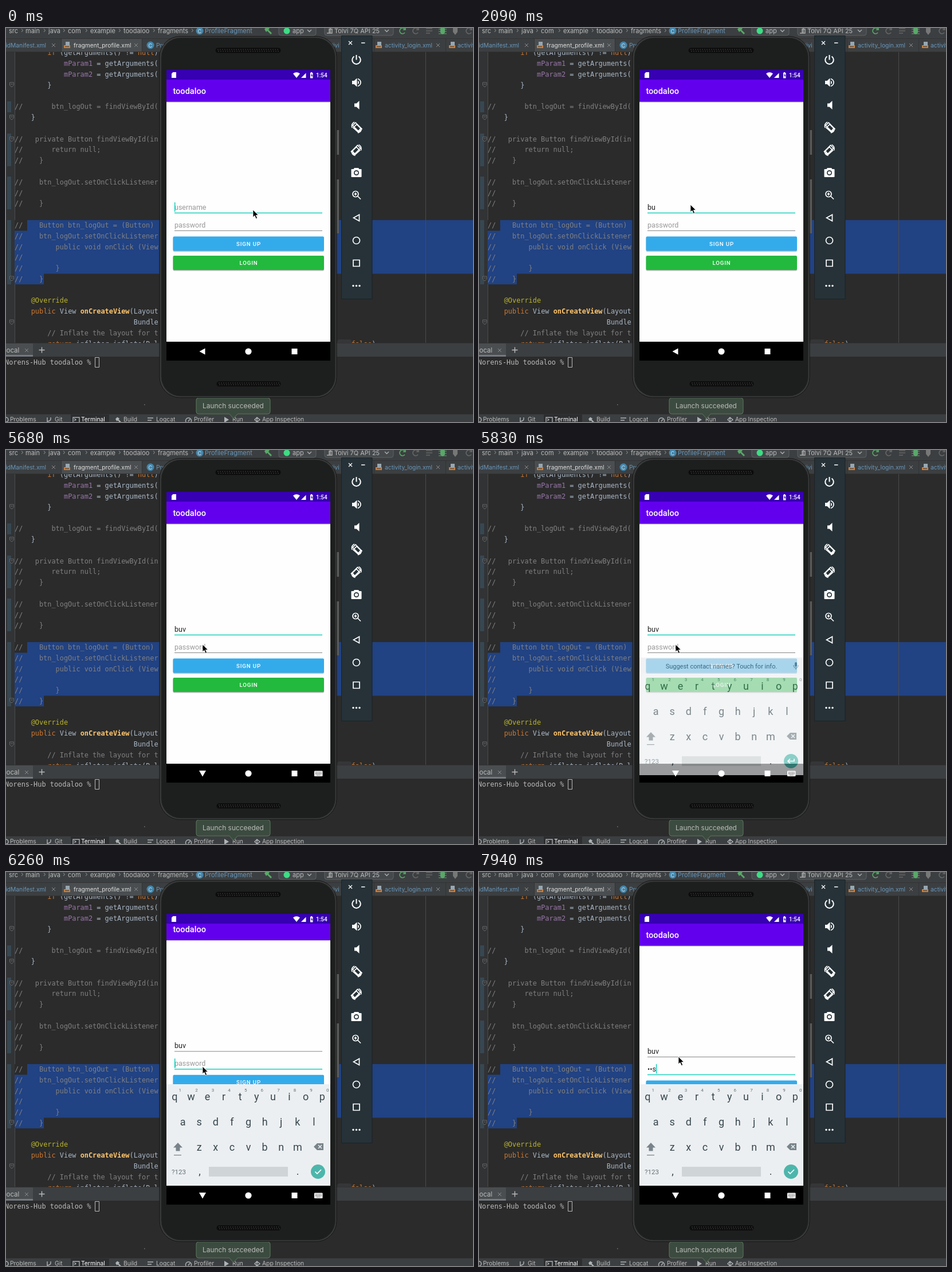
Recreate the animation shown at these times as an HTML page. Size 815 px wide and 687 px high, loop 8 s.

```html
<!DOCTYPE html>
<html lang="en">
<head>
<meta charset="utf-8">
<title>Login form in an emulator</title>
<style>
html, body { margin: 0; width: 100%; height: 100%; overflow: hidden; background: #2b2b2b; }
svg { display: block; }
text { white-space: pre; }
.mono { font: 11.9px "DejaVu Sans Mono", monospace; fill: #a9b7c6; }
.ui { font: 10.3px Inter, sans-serif; fill: #bbb; }
.app { font: 12.5px Roboto, sans-serif; fill: #222; }
.hint { fill: #999; }
.btn { font: 500 9.7px Roboto, sans-serif; letter-spacing: .85px; fill: #fff; text-anchor: middle; }
.line { fill: none; stroke: #fff; stroke-width: 1.7; }
#keys { font: 18px Roboto, sans-serif; fill: #37474f; text-anchor: middle; }
</style>
</head>
<body>
<svg width="815" height="687" viewBox="0 0 815 687">
  <defs>
    <clipPath id="screen"><path d="M280 73h286v507H280z"/></clipPath>
    <g id="rerun" fill="none" stroke-width="1.6"><path d="M4 3a5 5 0 1 1 0-6M5-6v4H1"/></g>
    <g id="file"><path fill="#9aa7b0" d="M-3-6h7v6h-7z"/><path fill="#d0803a" d="M-6 0H5v5H-6z"/><path stroke="#3c3f41" d="M-4 2.5h7"/></g>
    <path id="close" stroke="#888" d="M-3-3l6 6m0-6l-6 6"/>
    <path id="hammer" d="M-6-3l4-4 5 3-2 2 6 6-2 2-6-6-2 2z"/>
    <g id="fold" fill="#313335" stroke="#666"><path d="M-3.5-4h7v5l-3.5 3-3.5-3z"/><path d="M-2-1h4"/></g>
  </defs>

  <!-- editor -->
  <path fill="#2b2b2b" d="M0 0h815v687H0z"/>
  <path fill="#313335" d="M0 42h15v507H0z"/>
  <path fill="#374752" d="M2 128h7v19H2zM2 184h7v57H2zM2 259h7v57H2zM2 335h7v112H2z"/>
  <path fill="#214283" d="M37 335h778v93.5H66V447H15v-93.5h22z"/>
  <path stroke="#4b4b4b" d="M15.5 42v293M15.5 447v102M732.5 42v507"/>
  <g id="folds"></g>
  <g id="code" class="mono"></g>
  <rect x="578" y="543" width="25" height="14" rx="4" fill="#353638"/>

  <!-- toolbar and tabs -->
  <path fill="#3c3f41" d="M0 0h815v42H0z"/>
  <path fill="#4a4e50" d="M97 19h140v23H97z"/>
  <path stroke="#323232" d="M0 18.5h815M0 41.5h815M96.5 19v22M237.5 19v22M642.5 19v22M767.5 19v22"/>
  <g fill="#45494b" stroke="#5e6264"><rect x="476" y="-9" width="65" height="22" rx="4"/><rect x="556" y="-9" width="120" height="22" rx="4"/></g>
  <circle cx="490" cy="5" r="5.5" fill="#3ddc84"/>
  <path fill="none" stroke="#aaa" stroke-width="1.4" d="M526 3l3.5 3.5L533 3M661 3l3.5 3.5L668 3M560-2h6v11h-6M569 9h-5V2h5z"/>
  <use href="#hammer" x="457" y="5" fill="#59a869"/>
  <g stroke="#59a869"><use href="#rerun" x="692" y="5"/></g>
  <g stroke="#666"><use href="#rerun" x="715" y="5"/><use href="#rerun" x="808" y="5"/></g>
  <path stroke="#666" stroke-width="1.5" d="M733 1h11M733 5h11M733 9h7"/>
  <path fill="#59a869" d="M758 1q4-6 8 0v7q-4 6-8 0z"/>
  <path stroke="#59a869" d="M755 2h14M755 6h14M755 10h14"/>
  <path fill="#777" d="M780 0h8v7l-4 5-4-5z"/>
  <g fill="#4387ad"><circle cx="338" cy="5" r="6.5"/><circle cx="252" cy="30" r="6.5"/></g>
  <g id="tops" class="ui"></g>
  <use href="#file" x="107" y="30"/><use href="#file" x="651" y="30"/><use href="#file" x="779" y="30"/>
  <use href="#close" x="83" y="30"/><use href="#close" x="227" y="30"/><use href="#close" x="754" y="30"/>

  <!-- terminal and status strip -->
  <path fill="#3c3f41" d="M0 549h815v24H0zM0 674h815v13H0z"/>
  <path stroke="#323232" d="M0 549.5h815M0 673.5h815"/>
  <path fill="#4a4e50" d="M0 550h47v23H0z"/><path fill="#747a80" d="M0 570h47v3H0z"/>
  <use href="#close" x="36" y="562"/>
  <path stroke="#bbb" stroke-width="1.4" d="M57.500 561.500h10m-5-5v10"/>
  <text class="mono" x="-2" y="587" style="fill:#bbb">Norens-Hub toodaloo %</text>
  <path fill="none" stroke="#bbb" d="M155.500 574.500h7v17h-7z"/>
  <path fill="#777" d="M241 656h1.500v1.500H241z"/>
  <path fill="#2c2e30" d="M113 674h67v13h-67z"/>
  <g id="tools" class="ui"></g>
  <g fill="none" stroke="#aeb3b6" stroke-width="1.4">
    <circle cx="0" cy="683" r="4"/><path d="M72 679v9M78 679v3q0 3-6 4M117 679h11v9h-11zM119 681l3 2-3 2M247 680h10M247 684h7M314 687a5 5 0 1 1 9 0M318 686l3-4"/>
    <path fill="#aeb3b6" stroke="none" d="M381 678l8 5-8 5z"/><path d="M434 683l4-4 5 4-5 4zM438 679v8"/>
  </g>
  <use href="#hammer" x="196" y="684" fill="#aeb3b6" transform="translate(39 137) scale(.8)"/>
  <path fill="#3c4b3f" stroke="#5c7a5f" d="M336 645h121q4 0 4 4v20q0 4-4 4h-53l-7 8-7-8h-54q-4 0-4-4v-20q0-4 4-4z"/>
  <text class="ui" x="343" y="663" style="font-size:11.900px">Launch succeeded</text>

  <!-- phone -->
  <path fill="#5a5a5a" d="M577 178h4v43h-4zM577 264h4v94h-4z"/>
  <rect x="268" y="14.500" width="309" height="630" rx="36" fill="#3b3c3c" stroke="#151515"/>
  <rect x="271" y="17" width="303.500" height="625" rx="34" fill="#1d1e1e" stroke="#292a2a"/>
  <g stroke="#0c0c0c" stroke-width="9" stroke-linecap="round"><path d="M370 39h105M372 620.500h103"/></g>
  <path stroke="#333" stroke-width="1.500" stroke-dasharray="2 2" d="M369 37.500h108M370 40.500h108M371 619h106M372 622h106"/>

  <g clip-path="url(#screen)">
    <path fill="#fefefe" d="M280 73h286v507H280z"/>
    <g id="page" class="app">
      <path fill="#6200ee" d="M280 80h286v48.800H280z"/>
      <path opacity=".15" d="M280 128.800h286v1.400H280z"/>
      <text x="291.500" y="115" style="font:500 14.500px Roboto,sans-serif;fill:#fff">toodaloo</text>
      <text id="user" x="294" y="317"></text>
      <text id="pass" x="294" y="348"></text>
      <path id="line0" d="M294 322.500h258"/>
      <path id="line1" d="M294 353.500h258"/>
      <path id="caret" fill="#03cdb9" d="M0 0h1.400v16.500H0z"/>
      <path id="handle" fill="#2bd1c2" d="M308.300 322l5 3.300a7 7 0 1 1-10 0z"/>
      <g opacity=".3"><rect x="291.500" y="365" width="263.500" height="25" rx="2"/><rect x="291.500" y="398.500" width="263.500" height="25" rx="2"/></g>
      <rect x="291.500" y="363.500" width="263.500" height="25" rx="2" fill="#33abeb"/>
      <rect x="291.500" y="397" width="263.500" height="25" rx="2" fill="#23b93e"/>
      <text class="btn" x="423.500" y="380">SIGN UP</text>
      <text class="btn" x="423.500" y="413">LOGIN</text>
    </g>
    <path fill="#3700b3" d="M280 73h286v17H280z"/>
    <g fill="#fff">
      <path d="M291.500 77h5.500v10h-8v-7.500zM501 79.500q6-4.500 12 0l-6 7.500zM515 87l8.500-8.500V87zM531 78h1v-1h2v1h1.500v9.500H531z"/>
      <path fill="#3700b3" d="M534 79.500l-2 3.500h1.300v3l2-3.700H534z"/>
      <text x="541" y="86" style="font:500 10px Roboto,sans-serif">1:54</text>
    </g>
    <path d="M280 547h286v33H280z"/>
    <g id="keyboard">
      <path fill="#eceff1" d="M280 370h286v177H280z"/>
      <g id="strip">
        <path fill="#e9ecee" d="M280 342h286v28H280z"/>
        <text x="423" y="361" style="font:11px Roboto,sans-serif;fill:#37474f;text-anchor:middle">Suggest contact names? Touch for info.</text>
        <rect x="551" y="350" width="4" height="8" rx="2" fill="#607078"/>
        <path fill="none" stroke="#607078" d="M549 355q0 5 4 5t4-5M553 360v3"/>
      </g>
      <path fill="#cfd4d6" d="M354 514h138v17H354z"/>
      <g id="keys"></g>
      <path fill="#78848a" d="M300 472l8 8.500h-4.500v6h-7v-6H292zM293 493h13v1.200h-13zM543 473h11v12h-11l-6-6z"/>
      <path stroke="#eceff1" stroke-width="1.500" d="M545 476l6 6m0-6l-6 6"/>
      <circle cx="544.500" cy="522.500" r="12.500" fill="#4db6ac"/>
      <path id="enter" class="line"/>
    </g>
    <g fill="#fff">
      <path id="back"/>
      <circle cx="423" cy="564" r="5.600"/><path d="M498.500 559h10v10h-10z"/>
      <g id="switcher"><rect x="538" y="559.500" width="14.500" height="9.500" rx="1"/><path stroke="#111" stroke-dasharray="1.500 1" d="M540 562h11M540 564.500h11M542 567h7"/></g>
    </g>
  </g>

  <!-- emulator controls -->
  <path fill="#263238" stroke="#1b2226" d="M585.500 13.500h53.500v459h-53.500z"/>
  <path class="line" style="stroke-width:1.300" d="M598 23l6 6m0-6l-6 6M620 26h6.500"/>
  <g class="line">
    <path stroke-width="2" d="M607.500 49.500a7.300 7.300 0 1 0 8 0M611.500 47v8.500"/>
    <path id="turn" d="M606 174l6-6 7 7-5 6zM604 174q-2-7 4-10M620 174q1 7-6 9M605 170l5-5 11 11-5 5z"/>
    <use href="#turn" transform="matrix(-1 0 0 1 1223.500 39.500)"/>
    <circle cx="610" cy="289.500" r="5"/><path d="M613.500 293l5.500 5.500M607.500 289.500h5M610 287v5"/>
    <path d="M616.500 325.500v11l-10-5.500z"/><circle cx="611.500" cy="370.500" r="6"/><path d="M606 404.500h11v11h-11z"/>
  </g>
  <g fill="#fff">
    <path d="M604 92h3.500l5-4.500v15l-5-4.500H604zM608 131.500h3.500l5-4.500v15l-5-4.500H608zM614 91.500q4 3.500 0 7z"/>
    <path class="line" d="M614 88.500q5 2 5 6.500t-5 6.500" style="fill:none"/>
    <path d="M608 244h7l1.500 2h3q1 0 1 1v12q0 1-1 1h-16q-1 0-1-1v-12q0-1 1-1h3z"/>
    <circle cx="611.500" cy="252.500" r="4.500" fill="#263238"/><circle cx="611.500" cy="252.500" r="2.800"/>
    <circle cx="606" cy="449.500" r="1.700"/><circle cx="611.500" cy="449.500" r="1.700"/><circle cx="617" cy="449.500" r="1.700"/>
  </g>
  <path id="pointer" stroke="#fff" stroke-width=".8" d="M0 0v13l3-2.700 2.300 5.200 2.300-1-2.300-5h4.200z"/>
</svg>

<script>
const $ = id => document.getElementById(id);
const text = (x, y, s, style = '') => `<text x="${x}" y="${y}" style="${style}">${s}</text>`;

// editor lines: row, column, text, colour
const grey = '#808080', orange = '#cc7832', violet = '#9876aa';
const code = [
  [0, 8, 'if', orange], [0, 11, '(getArguments() !='], [0, 30, 'null', orange], [0, 34, ')'],
  [1, 12, 'mParam1', violet], [1, 20, '= getArguments('],
  [2, 12, 'mParam2', violet], [2, 20, '= getArguments('],
  [3, 8, '}'], [6, 4, '}'],
  [23, 4, '@Override', '#bbb529'],
  [24, 4, 'public', orange], [24, 11, 'View'], [24, 16, 'onCreateView', '#ffc66d;font-weight:bold'], [24, 28, '(Layout'],
  [25, 29, 'Bundle'], [26, 8, '// Inflate the layout for t', grey],
  [27, 8, 'return', orange], [27, 15, 'inflater.inflate(R.l'], [27, 82, 'false', orange], [27, 87, ');']
];
const comments = {
  5: '       btn_logOut = findViewById(', 8: '   private Button findViewById(in', 9: '       return null;',
  10: '    }', 12: '    btn_logOut.setOnClickListener', 13: '', 14: '    }',
  16: '    Button btn_logOut = (Button)', 17: '    btn_logOut.setOnClickListener',
  18: '        public void onClick (View', 19: '', 20: '        }', 21: '    }'
};
for (const row in comments) code.push([+row, 0, '//' + comments[row], grey]);
$('code').innerHTML = code.map(([row, col, s, c]) =>
  text(15 + col * 7.165, 47.3 + row * 18.79, s, c ? 'fill:' + c : '')).join('');
$('folds').innerHTML = [99, 156, 194, 437, 513].map(y => `<use href="#fold" x="10" y="${y}"/>`).join('');

const blue = 'fill:#6897bb';
const crumbs = [[5, 'src'], [34, 'main'], [74, 'java'], [108, 'com'], [147, 'example'], [205, 'toodaloo'],
  [265, 'fragments'], [347, 'ProfileFragment', blue], [500, 'app'], [573, 'Tolvi 7Q API 25']];
const tabs = [[-7, 'oidManifest.xml', blue], [118, 'fragment_profile.xml', 'fill:#ddd'], [262, 'ProfileFragment', blue],
  [556, 'activi', blue], [661, 'activity_login.xml', blue], [788, 'activity_main', blue]];
$('tops').innerHTML =
  crumbs.map(([x, s, c = '']) => text(x, 8.5, s, 'font-size:11px;' + c)).join('') +
  [26, 65, 99, 138, 196, 256, 323].map(x => text(x, 8, '›', 'fill:#888;font-size:12px')).join('') +
  tabs.map(([x, s, c]) => text(x, 33.5, s, c)).join('') +
  ['338 9', '252 34'].map(p => { const [x, y] = p.split(' '); return text(x - 3.5, y, 'C', 'fill:#d5e4ec;font-size:9px'); }).join('');
$('tools').innerHTML = text(-6, 565.5, 'Local', 'font-size:11.5px') +
  [[7, 'Problems'], [85, 'Git'], [131, 'Terminal', 'fill:#fff'], [205, 'Build'], [262, 'Logcat'],
    [328, 'Profiler'], [395, 'Run'], [447, 'App Inspection']].map(([x, s, c]) => text(x, 686.3, s, c)).join('');

const rows = [['qwertyuiop', 294.3, 398], ['asdfghjkl', 308.6, 442], ['zxcvbnm', 337.2, 485.500]];
$('keys').innerHTML = rows.map(([s, x, y]) =>
  [...s].map((c, i) => text(x + i * 28.6, y, c)).join('')).join('') +
  [...'1234567890'].map((c, i) => text(303.8 + i * 28.6, 383, c, 'font-size:8px;fill:#607078')).join('') +
  text(301.5, 526.500, '?123', 'font-size:11.500px;fill:#607078') + text(338, 528, ',') + text(509, 528, '.');

// time, then whatever changes at that time
const steps = [
  [0, { at: [431, 317], user: '', pass: '', focus: 0, caret: 1, handle: 0, ime: 0, keys: 0, drop: 0, strip: 1, pan: 0 }],
  [300, { at: [414, 319] }], [450, { at: [390, 318] }], [600, { at: [376, 315] }], [890, { at: [369, 308] }],
  [1340, { user: 'bu' }], [2090, { caret: 0 }],
  [2380, { caret: 1, handle: .6 }], [2530, { handle: 1 }], [3130, { caret: 0 }],
  [3430, { caret: 1, at: [362, 318] }], [3580, { at: [350, 332] }], [3730, { at: [343, 339] }],
  [5070, { handle: 0 }], [5220, { user: 'buv' }], [5520, { ime: 1 }], [5680, { caret: 0 }],
  [5830, { keys: .65, drop: 20 }], [5970, { keys: 1, drop: 0, caret: 1 }],
  [6120, { focus: 1, strip: 0, pan: 4 }], [6260, { pan: 9.7 }], [6440, { pan: 0 }],
  [6740, { at: [345, 334], caret: 0 }], [6890, { at: [347, 326] }], [7040, { at: [348, 322], caret: 1 }],
  [7490, { pass: '•n' }], [7940, { pass: '••s' }]
];

const set = (id, attrs) => { for (const k in attrs) $(id).setAttribute(k, attrs[k]); };

function field(id, value, hint) {
  $(id).textContent = value || hint;
  set(id, { class: value ? '' : 'hint' });
}

function draw(time) {
  const s = Object.assign({}, ...steps.filter(p => p[0] <= time).map(p => p[1]));
  field('user', s.user, 'username');
  field('pass', s.pass, 'password');
  for (const i of [0, 1])
    set('line' + i, s.focus === i ? { stroke: '#1ccdbd', 'stroke-width': 1.4 } : { stroke: '#868686', 'stroke-width': 1 });
  const id = s.focus ? 'pass' : 'user';
  const x = 294 + (s[id] ? $(id).getComputedTextLength() : 0);
  set('caret', { opacity: s.caret, transform: `translate(${x} ${304 + 31 * s.focus})` });
  set('handle', { opacity: s.handle });
  set('page', { transform: `translate(0 ${-s.pan})` });
  set('keyboard', { opacity: s.keys, transform: `translate(0 ${s.drop})` });
  set('strip', { opacity: s.strip });
  set('enter', { d: s.focus ? 'M539.500 522.500l3.500 3.500 7-7' : 'M550 518.500v4h-11m4-4l-4 4 4 4' });
  set('back', { d: s.ime ? 'M337 559h12l-6 10.500z' : 'M347.500 558.500v11l-10-5.500z' });
  set('switcher', { opacity: s.ime });
  set('pointer', { transform: `translate(${s.at})` });
}

const start = performance.now();
function tick() {
  draw((performance.now() - start) % 8000);
  requestAnimationFrame(tick);
}
tick();
</script>
</body>
</html>
```
